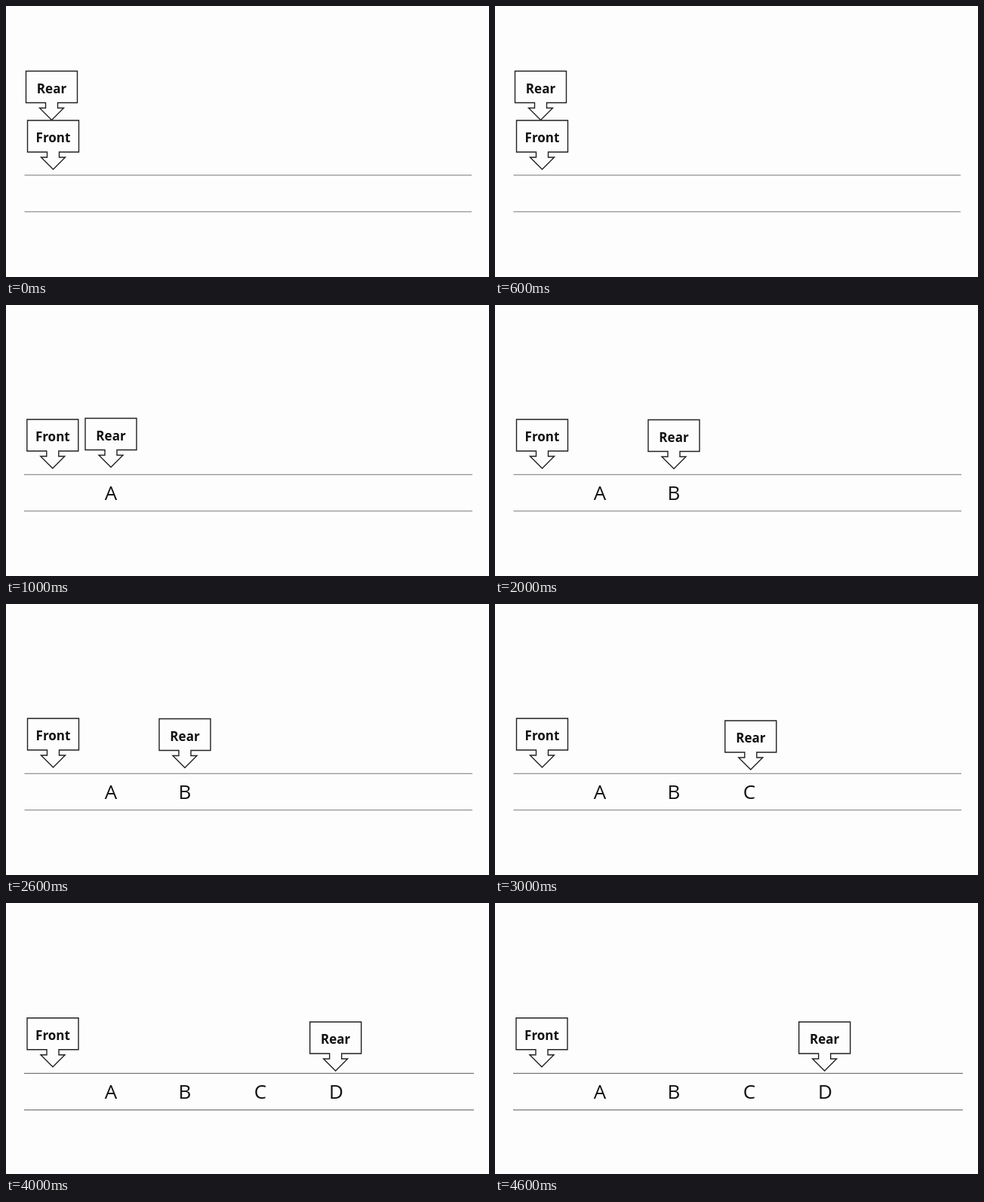
Write an HTML page that moves like this. It is 640x360 px and loops after 5 s.

```html
<!DOCTYPE html>
<html lang="en">
<head>
<meta charset="utf-8">
<title>Queue: enqueue</title>
<style>
  html, body { margin: 0; width: 100%; height: 100%; overflow: hidden; background: #fdfdfd; }
  svg { display: block; width: 100%; height: 100%; }
  text { font-family: "Open Sans", "Noto Sans", sans-serif; text-anchor: middle; fill: #111; }
  .label { font-size: 17px; font-weight: 700; }
  .item { font-size: 26px; }
  .callout { fill: none; stroke: #222; stroke-width: 1.4; }
  .rail { stroke: #777; stroke-width: 1.1; }
</style>
</head>
<body>
<svg viewBox="0 0 640 360">
  <defs><path id="box" class="callout" d="M0 0H68V42H42V49H50L34 65L18 49H26V42H0Z"/></defs>
  <line id="top" class="rail"/>
  <line id="bottom" class="rail"/>
  <g id="front"><use href="#box"/><text class="label" x="34" y="29">Front</text></g>
  <g id="rear"><use href="#box"/><text class="label" x="34" y="29">Rear</text></g>
  <g id="items">
    <text class="item" x="139">A</text>
    <text class="item" x="237">B</text>
    <text class="item" x="337">C</text>
    <text class="item" x="437.5">D</text>
  </g>
</svg>
<script>
const STEP = 1000;
// The step's index is also the number of queued items.
const steps = [
  { front: [28.5, 152], rear: [26.5, 86.5], rail: [24.5, 617, 224.7] },
  { front: [27.8, 152], rear: [105, 150.5], rail: [24, 618, 225.2] },
  { front: [28.5, 152], rear: [203, 152.5], rail: [24.5, 618, 225.2] },
  { front: [28.5, 152], rear: [304.8, 155], rail: [24.5, 618, 225.2] },
  { front: [28, 152.8], rear: [402.7, 158], rail: [24, 620, 226.4] }
];
const el = id => document.getElementById(id);
const place = (id, [x, y]) => el(id).setAttribute("transform", `translate(${x} ${y})`);

function setRail(id, x1, x2, y) {
  for (const [key, value] of Object.entries({ x1, x2, y1: y, y2: y })) el(id).setAttribute(key, value);
}

let shown = -1;
function draw(now) {
  const count = Math.floor(now / STEP) % steps.length;
  if (count !== shown) {
    shown = count;
    const { front, rear, rail: [left, right, y] } = steps[count];
    place("front", front);
    place("rear", rear);
    setRail("top", left, right, y);
    setRail("bottom", left, right, y + 48.5);
    [...el("items").children].forEach((item, i) => {
      item.setAttribute("y", y + 33.4);
      item.style.display = i < count ? "" : "none";
    });
  }
}

const start = performance.now();
function tick() {
  draw(performance.now() - start);
  requestAnimationFrame(tick);
}
tick();
</script>
</body>
</html>
```
